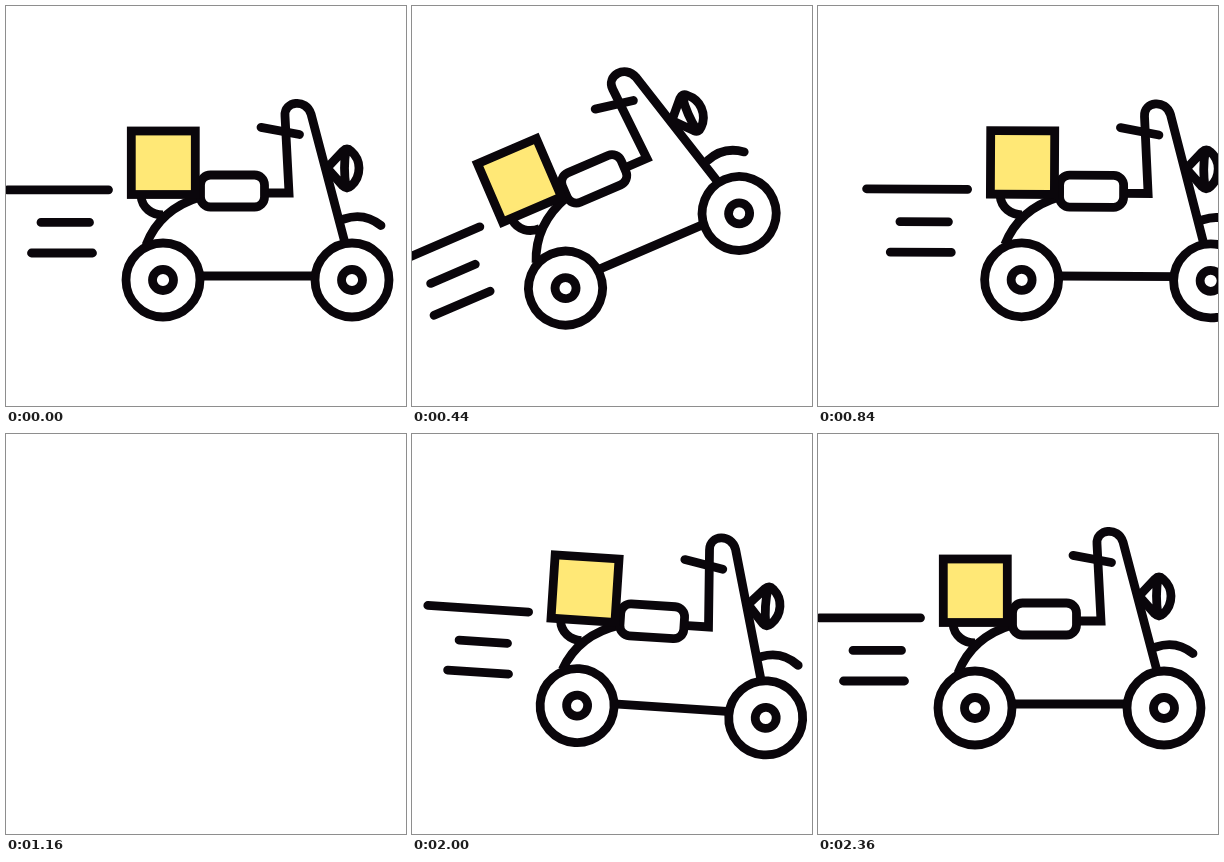
An HTML page for the animation above (4000 ms loop, 400 px wide and 400 px high).

```html
<!DOCTYPE html>
<html lang="en">
<head>
<meta charset="utf-8">
<title>Delivery scooter</title>
<style>
  html, body { margin: 0; width: 100%; height: 100%; overflow: hidden; background: #fff; }
  svg { display: block; width: 100%; height: 100%; }
</style>
</head>
<body>
<svg viewBox="0 0 400 400">
  <defs>
    <g id="wheel">
      <circle r="37" fill="#fff"/>
      <circle r="10.5"/>
    </g>
  </defs>
  <g id="scooter" fill="none" stroke="#0a060b" stroke-width="8.8">
    <path id="speed" stroke-linecap="round" d="M1.5 183.8H102.5M35 216.4H83.5M25.5 247H86.5"/>
    <path id="frame" d="M190 270H314M194 191Q154 203 140 239M135 190C136 202 146 209 157 209"/>
    <path id="column" d="M258 187H283L279 110C278 95 300 92 305 108L339 237"/>
    <path id="handlebar" stroke-linecap="round" d="M255 121.3L293.5 128.5"/>
    <path id="fender" stroke-linecap="round" d="M338 213Q358 206 375 219.5"/>
    <path id="lamp" stroke-linejoin="round"
      d="M321 162L337 145Q341 141 345 145Q353 152 353 162Q353 173 345 180Q341 184 337 180ZM340 144Q337 162 340 181"/>
    <rect id="seat" x="194.5" y="169" width="64" height="32" rx="10" fill="#fff"/>
    <rect id="parcel" x="125.3" y="125" width="64" height="63.5" fill="#ffe876"/>
    <use href="#wheel" x="157" y="274"/>
    <use href="#wheel" x="346" y="274"/>
  </g>
</svg>
<script>
const LOOP = 4000, STEP = 40, ARRIVED = 2360;
const PIVOT = "192 204";
const OFFSTAGE = 600;
const scooter = document.getElementById("scooter");

const progress = (t, from, to) => Math.min(1, Math.max(0, (t - from) / (to - from)));
const smooth = p => p * p * (3 - 2 * p);

// Back up, dash off to the right, fly in from the left, roll back to rest.
function shift(t) {
  const back = -34, overshoot = 22;
  if (t < 430) return back * smooth(t / 430);
  if (t < 1200) return back + 81 * ((t - 420) / 420) ** 3.1;
  if (t < 1720) return OFFSTAGE;
  if (t < 2103) return overshoot - 412 * ((2103 - t) / 363) ** 3;
  return overshoot * (1 - progress(t, 2103, ARRIVED) ** 2);
}

// Rear up, drop back, dip the nose while moving, level out.
function tilt(t) {
  const rear = -25, dip = 4.5;
  if (t < 650) return rear * (smooth(progress(t, 0, 400)) - smooth(progress(t, 400, 650)));
  return dip * (smooth(progress(t, 650, 1840)) - progress(t, 1840, ARRIVED) ** 1.5);
}

function draw(time) {
  const t = Math.floor((time % LOOP) / STEP) * STEP;
  scooter.setAttribute("transform", `translate(${shift(t)} 0) rotate(${tilt(t)} ${PIVOT})`);
}

const start = performance.now();
function tick() {
  draw(performance.now() - start);
  requestAnimationFrame(tick);
}
tick();
</script>
</body>
</html>
```
